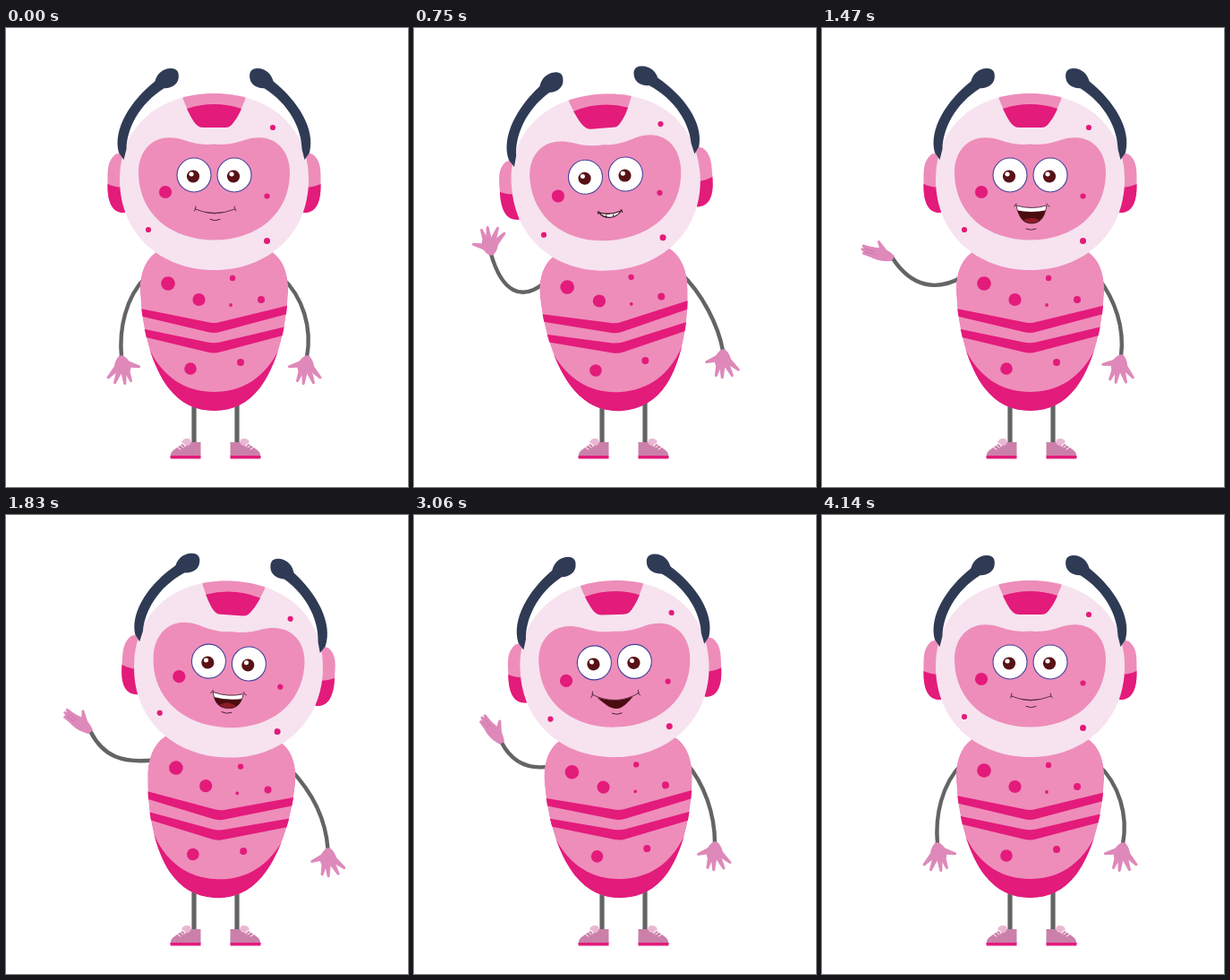
An HTML page with a canvas for the animation above (4.17 s loop, 449x512 px).

```html
<!DOCTYPE html>
<html lang="en">
<head>
<meta charset="utf-8">
<title>Waving pink robot</title>
<style>
html, body { margin: 0; width: 100%; height: 100%; overflow: hidden; background: #fff; }
canvas { display: block; width: 449px; height: 512px; }
</style>
</head>
<body>
<canvas id="stage" width="449" height="512"></canvas>
<script>
const ctx = document.getElementById('stage').getContext('2d');
const LOOP = 4170;
const HOLDS = [510, 1110, 2790, 3390, 3630];
const PIVOT = [232, 424];
const PINK = '#ee8dba', HOT = '#e31b7b', PALE = '#f6e3ef', SKIN = '#de89ba';
const NAVY = '#2f3b55', GREY = '#636464', DARK = '#4b0c10', INK = '#3a1a2a';

// time, lean in degrees
const LEAN = [
  [0, 0], [60, 0], [540, -4.1], [750, -4.1], [1140, 0], [1500, 0], [1920, 4.1],
  [2720, -2.1], [3060, -1.9], [3450, 1.75], [3750, 1.75], [4140, 0]
];

// control 1, control 2, wrist, hand angle
const L = {
  rest: [134, 300, 126, 335, 129, 367, 0],
  wave: [120, 306, 98, 294, 86, 252, 180],
  show: [128, 294, 100, 289, 79, 257, 110],
  high: [130, 271, 112, 262, 100, 236, 137],
  bent: [128, 284, 110, 277, 98, 254, 145],
  flat: [138, 300, 112, 304, 90, 285, 90]
};
const LEFT = [
  [0, ...L.rest], [60, ...L.rest], [420, ...L.wave], [800, ...L.wave],
  [1110, ...L.show], [1500, ...L.show], [2000, ...L.high], [2370, ...L.high],
  [2800, ...L.bent], [3060, ...L.bent], [3390, ...L.flat], [3750, ...L.flat],
  [4140, ...L.rest]
];
const R = {
  rest: [332, 300, 342, 335, 336, 367, 0],
  out: [322, 296, 340, 332, 345, 360, -6],
  near: [328, 304, 338, 335, 334, 366, 4],
  far: [346, 312, 360, 342, 363, 374, -10],
  mid: [325, 300, 336, 335, 336, 366, -5],
  low: [334, 304, 344, 340, 342, 371, -8]
};
const RIGHT = [
  [0, ...R.rest], [60, ...R.rest], [450, ...R.out], [800, ...R.out],
  [1140, ...R.near], [1500, ...R.near], [1920, ...R.far], [2720, ...R.mid],
  [3060, ...R.mid], [3450, ...R.low], [3750, ...R.low], [4140, ...R.rest]
];
// one mouth shape per 120 ms
const SPEECH = 'ccsmbssmvmsbbmsmvsmmbsvmvvmsbmmmscc';

function pose(keys, t) {
  let i = 0;
  while (i < keys.length - 2 && t >= keys[i + 1][0]) i++;
  const a = keys[i], b = keys[i + 1];
  const u = Math.min(1, Math.max(0, (t - a[0]) / (b[0] - a[0])));
  const s = u * u * (3 - 2 * u);
  return a.slice(1).map((v, k) => v + (b[k + 1] - v) * s);
}

function fill(d, color) {
  ctx.fillStyle = color;
  ctx.fill(new Path2D(d));
}

function line(d, color, width) {
  ctx.strokeStyle = color;
  ctx.lineWidth = width;
  ctx.lineCap = 'round';
  ctx.stroke(new Path2D(d));
}

function oval(x, y, rx, ry, color, turn = 0) {
  ctx.fillStyle = color;
  ctx.beginPath();
  ctx.ellipse(x, y, rx, ry, turn, 0, 7);
  ctx.fill();
}

function dots(list) {
  for (const [x, y, r] of list) oval(x, y, r, r, HOT);
}

function both(sum, draw) {
  draw();
  ctx.save();
  ctx.translate(sum, 0);
  ctx.scale(-1, 1);
  draw();
  ctx.restore();
}

function leg() {
  line('M210 415V462', GREY, 5.2);
  fill('M217.5 462V478H184C183 470 193 469 198 462Z', '#cb80aa');
  fill('M183.5 477H217.5V480.5H184Q183 479 183.5 477Z', HOT);
  oval(201.5, 462, 5.2, 4.2, '#ebb6d3', -0.2);
  line('M192 463L198 468M189 466L195 470M195 464Q200 462 200 467', '#fff', 1);
}

function finger(x, y, tx, ty, w) {
  const a = Math.atan2(ty - y, tx - x), c = Math.cos(a), s = Math.sin(a), e = 1.5;
  const ex = tx - c * e, ey = ty - s * e;
  ctx.beginPath();
  ctx.moveTo(x - s * w, y + c * w);
  ctx.lineTo(ex - s * e, ey + c * e);
  ctx.arc(ex, ey, e, a + Math.PI / 2, a - Math.PI / 2, true);
  ctx.lineTo(x + s * w, y - c * w);
  ctx.fill();
}

function openHand() {
  fill('M-3 -1Q1 -3 4 0C9 4 11 8 10 15Q2 21 -7 16C-9 9 -7 4 -3 -1Z', SKIN);
  finger(-3, 10, -16, 24, 4);
  finger(-1, 12, -8, 30, 3.8);
  finger(2, 12, 4, 31, 3.8);
  finger(5, 12, 11, 28, 3.6);
  finger(3, 7, 21, 11, 4.4);
}

function palmHand() {
  fill('M1 -3C-5 -6 -12 -8 -18 -6L-26 -4Q-30 4 -24 7C-14 9 -6 6 0 3Z', SKIN);
  finger(-20, -1, -37, -2, 3.5);
  finger(-20, 2, -37, 2, 3.5);
  finger(-20, 4, -34, 6, 3.2);
  finger(-11, -3, -22, -13, 3.8);
  line('M-34 0H-22M-33 4L-22 3', '#c772a4', 0.7);
}

function spin(x, y, deg) {
  ctx.translate(x, y);
  ctx.rotate(deg * Math.PI / 180);
}

function turned(x, y, deg) {
  const a = deg * Math.PI / 180, c = Math.cos(a), s = Math.sin(a);
  const dx = x - PIVOT[0], dy = y - PIVOT[1];
  return [PIVOT[0] + dx * c - dy * s, PIVOT[1] + dx * s + dy * c];
}

function arm(start, p) {
  const [a, b, c, d, x, y] = p;
  line(`M${start}C${a} ${b} ${c} ${d} ${x} ${y}`, GREY, 4.4);
}

function body() {
  const shape = 'M169 249C153 259 149 279 150 296C152 340 164 378 181 401C195 419 212 427 232.5 427' +
    'C253 427 270 419 284 401C301 378 313 340 315 296C316 279 312 259 296 249Z';
  ctx.save();
  ctx.clip(new Path2D(shape));
  fill(shape, PINK);
  fill('M140 311L225 328Q232 330 239 328L325 307V316L239 339Q232 341 225 339L140 319Z', HOT);
  fill('M140 333L225 350.5Q232 352 239 350.5L325 330V339L239 361.5Q232 363.5 225 361.5L140 341Z', HOT);
  fill('M157 352C175 393 204 406 232.5 406C261 406 290 393 308 352V432H157Z', HOT);
  ctx.restore();
  dots([[181, 285, 7.8], [215.5, 303, 7.1], [253, 279, 3.2], [285, 303, 4],
    [251, 309, 1.9], [206, 380, 6.8], [262, 373, 4]]);
}

function ear() {
  fill('M136 137L122 141C113 149 113.5 158 113.5 172C113 195 119 207 133 206Z', PINK);
  fill('M113.5 174Q122 178 133 178V206C119 207 113 195 113.5 174Z', HOT);
}

function antenna() {
  fill('M167 59C139 81 119 113 126 139L131.5 147L134.5 135C135 113 148 85 177 67Z', NAVY);
  fill('M166 62C167 52 175 45 184 45C191 45 194 49 192.5 57C191 64 183 68 175 67C170 68 166 67 166 62Z', NAVY);
}

function eye(x) {
  oval(x, 164, 19, 19, '#fff');
  ctx.strokeStyle = '#45429a';
  ctx.lineWidth = 1.1;
  ctx.stroke();
  oval(x - 1, 165.5, 7.1, 7, '#581216');
  oval(x - 3, 163, 2.6, 2.5, '#fff');
}

function chin(y) {
  line(`M228 ${y}Q233.5 ${y + 2.6} 239 ${y}`, INK, 0.9);
}

function wide(bottom) {
  const shape = `M217 198Q234 203 251 198C249 208 246 ${bottom} 234 ${bottom}C223 ${bottom} 219 208 217 198Z`;
  ctx.save();
  ctx.clip(new Path2D(shape));
  fill(shape, DARK);
  oval(234, bottom + 2, 12, 8, '#8e1b27');
  fill('M216 196H252V203Q234 207 216 203Z', '#fff');
  ctx.restore();
  line(shape, INK, 0.8);
  line('M214.5 199Q216 198 217 196M251 196Q252 198 254 199', INK, 0.9);
}

const mouths = {
  c() {
    line('M211 202Q233 211 256 202M210.5 204Q212 202 212 199M255 199Q255 202 257 204', INK, 0.8);
    fill('M220 205Q233 208 246 205Q233 209.5 220 205Z', INK);
    chin(213.5);
  },
  s() {
    const shape = 'M222 204.5Q234 209 247 204.5Q242 211 234 211Q227 211 222 204.5Z';
    fill(shape, '#fff');
    line(shape, INK, 1.3);
    line('M221 206L222 203M247 203L248.5 206M230 208V210M238 208V210', INK, 1);
  },
  m() {
    wide(215);
    chin(219.5);
  },
  b() {
    wide(218);
    chin(224);
  },
  v() {
    line('M206 199Q233 214 259 199M205 203Q208 200 207 196M258 196Q257 200 260 202', INK, 0.8);
    fill('M212 203Q233 210 252 203C245 210 240 216 233 216C226 216 220 210 212 203Z', DARK);
    chin(221);
  }
};

function head(t) {
  both(465, ear);
  const shell = 'M232.5 73C294 73 338 110 338 169C338 230 292 270 232.5 270C173 270 127 230 127 169C127 110 171 73 232.5 73Z';
  fill(shell, PALE);
  ctx.save();
  ctx.clip(new Path2D(shell));
  fill('M196 72L198 80C202 90 206 99 212 106H253C259 99 263 90 267 80L269 72Z', PINK);
  ctx.restore();
  fill('M202 90Q232.5 80 263 90C259 99 255 105 251 109Q249 111 245 111H220Q216 111 214 109C209 105 206 98 202 90Z', HOT);
  fill('M232.5 129.5C246 131 258 128 268 124.5C300 115 318 137 317 163C316 208 280 236.5 232.5 236.5' +
    'C185 236.5 149 208 148 163C147 137 165 115 197 124.5C207 128 219 131 232.5 129.5Z', PINK);
  dots([[178, 183, 7.1], [298, 111, 3.1], [291.5, 187.5, 3.1], [159, 225, 3.1], [291.5, 237.5, 3.5]]);
  both(465, antenna);
  eye(210);
  eye(255);
  mouths[SPEECH[Math.min(34, Math.floor(t / 120))]]();
}

function draw(t) {
  const [lean] = pose(LEAN, t), left = pose(LEFT, t), right = pose(RIGHT, t);
  ctx.fillStyle = '#fff';
  ctx.fillRect(0, 0, 449, 512);
  both(468, leg);
  arm(turned(156, 278, lean), left);
  arm(turned(308, 278, lean), right);

  ctx.save();
  spin(...PIVOT, lean);
  ctx.translate(-PIVOT[0], -PIVOT[1]);
  body();
  head(t);
  ctx.restore();

  const palm = t >= 930 && t < 3880;
  ctx.save();
  spin(left[4], left[5], left[6] - (palm ? 90 : 0));
  palm ? palmHand() : openHand();
  ctx.restore();
  ctx.save();
  spin(right[4], right[5], right[6]);
  ctx.scale(-1, 1);
  openHand();
  ctx.restore();
}

const begin = performance.now();
function tick() {
  let t = Math.floor(((performance.now() - begin) % LOOP) / 30) * 30;
  for (const h of HOLDS) if (t >= h && t < h + 120) t = h;
  draw(t);
  requestAnimationFrame(tick);
}
tick();
</script>
</body>
</html>
```
